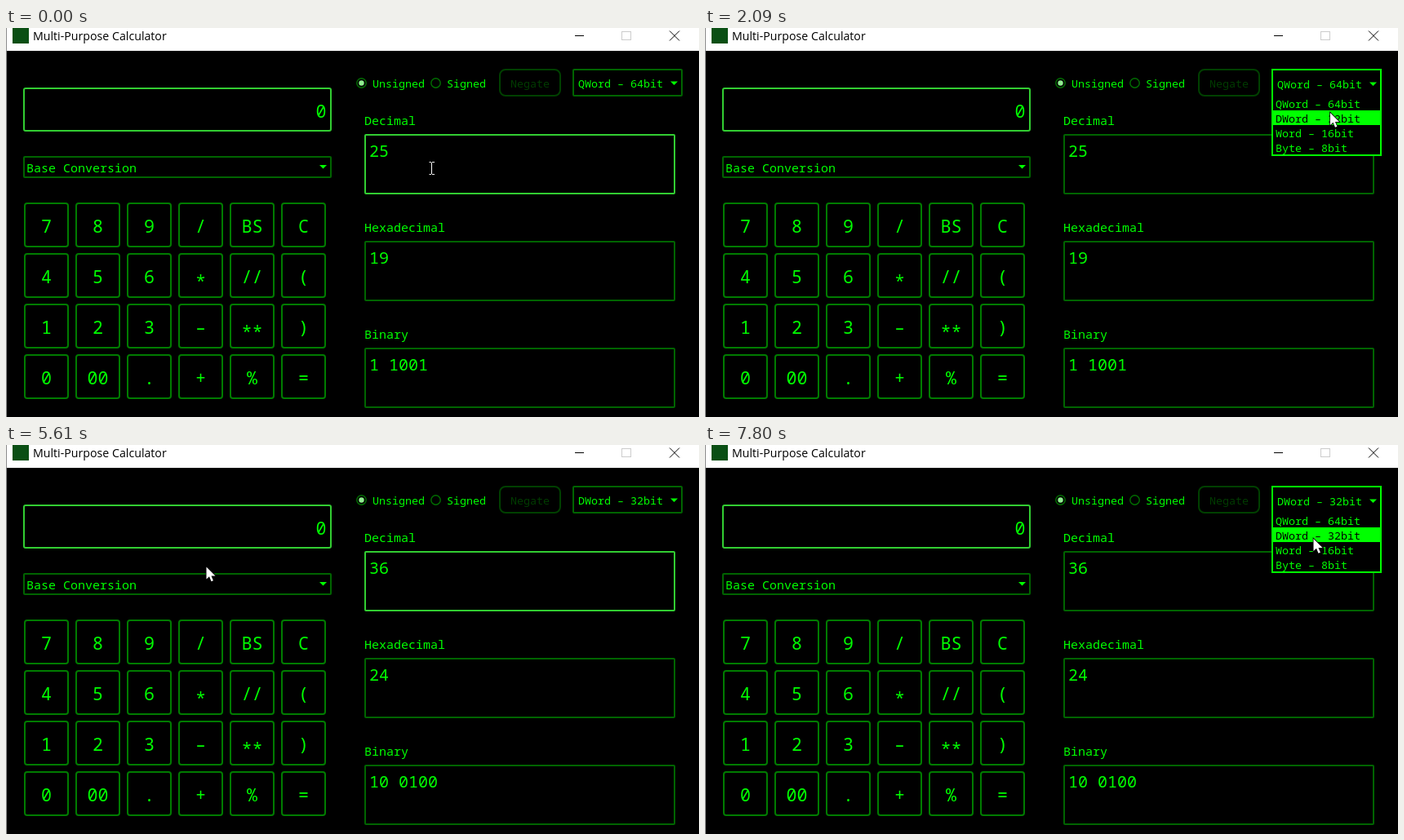
These frames come from a looping animation (849x477 px, 8 s). An HTML page:

```html
<!DOCTYPE html>
<html lang="en">
<head>
<meta charset="utf-8">
<title>Multi-Purpose Calculator</title>
<style>
  html, body { margin: 0; width: 100%; height: 100%; overflow: hidden; background: #000; }
  svg { display: block; width: 100vw; height: 100vh; }
  text { font-family: "Noto Sans Mono", "DejaVu Sans Mono", monospace; fill: #0f0; white-space: pre; }
  .s { font-size: 13.333px; }
  .m { font-size: 15px; }
  .l { font-size: 20px; }
  .xl { font-size: 21.667px; }
  .mid { text-anchor: middle; }
  .title { font: 14.2px "Open Sans", "Noto Sans", sans-serif; fill: #000; }
  .box { fill: #000; stroke: #006400; stroke-width: 2; }
  .key { stroke: #007c00; }
  .hover { stroke: #008a00; }
  .focus { stroke: #32cd32; }
  .off { stroke: #004000; }
  text.dim { fill: #003c00; }
  text.inv { fill: #000; }
  .win { fill: none; stroke: #000; }
  .fill { fill: #0f0; }
  .line { fill: none; stroke: #0f0; stroke-width: 2; }
</style>
</head>
<body>
<svg viewBox="0 0 849 477">
  <defs><clipPath id="below"><rect x="690" y="84" width="150" height="90"/></clipPath></defs>
  <rect width="849" height="477"/>
  <g id="chrome">
    <rect width="849" height="28" fill="#fff"/>
    <rect width="1" height="477" fill="#8c8c8c"/>
    <rect x="8" y="0" width="20" height="19" fill="#0a4f14"/>
    <text class="title" x="33" y="15">Multi-Purpose Calculator</text>
    <path class="win" d="M697 9.5H708"/>
    <rect class="win" x="754.5" y="4.5" width="11" height="10" style="stroke:#ccc"/>
    <path class="win" d="M813 3.5L825 15.5M825 3.5L813 15.5"/>
  </g>
  <g id="panel"></g>
  <g id="live"></g>
  <g id="cursor"></g>
</svg>
<script>
const LOOP = 8000;
const $ = id => document.getElementById(id);

// Boxes are given by their outer edges.
const box = (x, y, x2, y2, cls = "", r = 1) =>
  `<rect class="box ${cls}" x="${x + 1}" y="${y + 1}" width="${x2 - x - 2}" height="${y2 - y - 2}" rx="${r}"/>`;
const text = (x, y, str, cls) => `<text class="${cls}" x="${x}" y="${y}">${str}</text>`;
const fill = (x, y, w, h, color = "#0f0") =>
  `<rect x="${x}" y="${y}" width="${w}" height="${h}" fill="${color}"/>`;
const arrowDown = (x, y) => `<path class="fill" d="M${x - 4.5} ${y}h9l-4.5 4.5z"/>`;
const radio = (x, on) =>
  `<circle cx="${x}" cy="67.5" r="5.7" fill="#000" stroke="#007000" stroke-width="1.4"/>` +
  (on ? `<circle cx="${x}" cy="67.5" r="3.2" fill="#90ee90"/>` : "");

const KEYS = [
  ["7", "8", "9", "/", "BS", "C"],
  ["4", "5", "6", "*", "//", "("],
  ["1", "2", "3", "–", "**", ")"],
  ["0", "00", ".", "+", "%", "="]
];
const SIZES = ["QWord – 64bit", "DWord – 32bit", "Word – 16bit", "Byte – 8bit"];

function drawPanel() {
  let out = box(21, 73, 399, 127, "focus", 2) + text(379.5, 110, "0", "xl") +
    box(21, 157, 399, 184, "", 1) + text(25, 176.5, "Base Conversion", "m") + arrowDown(388.5, 168);
  KEYS.forEach((row, j) => row.forEach((key, i) => {
    const x = 22 + 63 * i, y = 214 + 62 * j;
    const drop = key[0] === "*" ? 5.5 : 0;
    out += box(x, y, x + 55, y + 55, "key", 3) + text(x + 27.5, y + 37 + drop, key, "xl mid");
  }));
  out += radio(435.5, true) + text(449, 73, "Unsigned", "s") +
    radio(526.5, false) + text(540, 73, "Signed", "s") +
    box(604, 50, 680, 84, "off", 7) + text(618, 73, "Negate", "s dim");
  ["Decimal", "Hexadecimal", "Binary"].forEach((name, i) => {
    out += text(439, 119 + 131 * i, name, "m");
  });
  return out;
}

function drawFields(s) {
  const n = s.value;
  const binary = n.toString(2).replace(/\B(?=(\d{4})+$)/g, " ");
  let out = "";
  [n, n.toString(16), binary].forEach((v, i) => {
    const y = 130 + 131 * i, first = i === 0;
    out += box(439, y, 820, y + 74, first ? s.field : "");
    if (first && s.sel) out += fill(445, 136, 24, 27);
    out += text(445, y + 28, v, "l" + (first && s.sel ? " inv" : ""));
  });
  if (s.caret) out += fill(s.caret, 136, 1, 27, "#fff");
  return out;
}

function drawCombo(s) {
  const dy = s.open ? 1 : 0;
  let out = s.open
    ? `<path class="line" d="M695 84V51H828V84"/>`
    : box(694, 50, 829, 84, s.combo);
  out += text(701, 73 + dy, SIZES[s.size], "s") + arrowDown(818.5, 65.5 + dy);
  if (s.slide === null) return out;
  let list = fill(694, 83, 135, 74, "#000") + fill(696, 83 + 18 * s.row, 131, 18);
  SIZES.forEach((name, i) => {
    list += text(699, 98 + 18 * i, name, i === s.row ? "s inv" : "s");
  });
  list += `<path class="line" d="M695 83V156H828V83"/>`;
  return out + `<g clip-path="url(#below)"><g transform="translate(0 ${-s.slide})">${list}</g></g>`;
}

function drawCursor([kind, x, y]) {
  const shape = kind === "beam"
    ? `<path d="M-3 -7.5H-.5M.5 -7.5H3.5M0 -7V7M-3 7.5H-.5M.5 7.5H3.5" transform="translate(.5 0)" fill="none" stroke="#fff"/>`
    : `<path d="M0 0V15L3.5 11.8L6 17.8L8.4 16.8L6 11H11Z" fill="#fff" stroke="#000" stroke-width="1.6" paint-order="stroke"/>`;
  return `<g transform="translate(${x} ${y})">${shape}</g>`;
}

const START = {
  cur: ["beam", 521, 172], caret: 0, value: 25, sel: false, field: "focus",
  combo: "", size: 0, open: false, slide: null, row: 0
};
const beam = (x, y) => ({ cur: ["beam", x, y] });
const arrow = (x, y) => ({ cur: ["arrow", x, y] });

// Each step changes part of the state and holds until the next one.
const STEPS = [
  [450, { caret: 469 }],
  [750, beam(522, 172)],
  [900, { ...beam(601, 187), caret: 0 }],
  [1040, beam(660, 148)],
  [1160, arrow(716, 103)],
  [1310, { ...arrow(752, 82), caret: 469, combo: "hover" }],
  [1430, arrow(768, 73)],
  [1580, { ...arrow(769, 72), caret: 0, field: "", slide: 50 }],
  [1700, { slide: 15 }],
  [1820, { ...arrow(769, 79), slide: 0, open: true }],
  [1970, { ...arrow(768, 101), row: 1 }],
  [2090, arrow(766, 104)],
  [2530, { ...beam(722, 152), slide: null, open: false, combo: "", size: 1 }],
  [2670, arrow(640, 108)],
  [2790, { ...beam(496, 152), field: "hover" }],
  [2940, { ...beam(390, 154), field: "focus", sel: true }],
  [3060, arrow(247.5, 149.5)],
  [3310, { ...arrow(246.5, 149.5), caret: 445 }],
  [3440, arrow(245.5, 149.5)],
  [4020, { caret: 0 }],
  [4300, { value: 3, sel: false }],
  [4440, { value: 36 }],
  [5000, { caret: 469 }],
  [5610, { caret: 0 }],
  [5890, arrow(244.5, 141.5)],
  [6040, arrow(560, 128)],
  [6160, { ...arrow(833, 118), caret: 469 }],
  [6310, arrow(758.5, 114.5)],
  [6470, arrow(748.5, 94)],
  [6590, { ...arrow(747, 80), combo: "hover" }],
  [6720, { ...arrow(747, 73), caret: 0 }],
  [6860, { field: "", slide: 45, row: 1 }],
  [6980, { ...arrow(747, 76), slide: 6 }],
  [7100, { ...arrow(747.5, 91.5), slide: 0, open: true, row: 0 }],
  [7220, { ...arrow(744, 112), row: 1 }],
  [7350, { ...arrow(742.5, 129), row: 2 }],
  [7500, arrow(743, 126.5)],
  [7650, { ...arrow(746, 116), row: 1 }],
  [7800, arrow(745.5, 115)]
];

let shown = -1;
function tick() {
  const t = performance.now() % LOOP;
  const past = STEPS.filter(([at]) => at <= t);
  if (past.length !== shown) {
    shown = past.length;
    const state = Object.assign({}, START, ...past.map(step => step[1]));
    $("live").innerHTML = drawFields(state) + drawCombo(state);
    $("cursor").innerHTML = drawCursor(state.cur);
  }
  requestAnimationFrame(tick);
}

$("panel").innerHTML = drawPanel();
tick();
</script>
</body>
</html>
```
